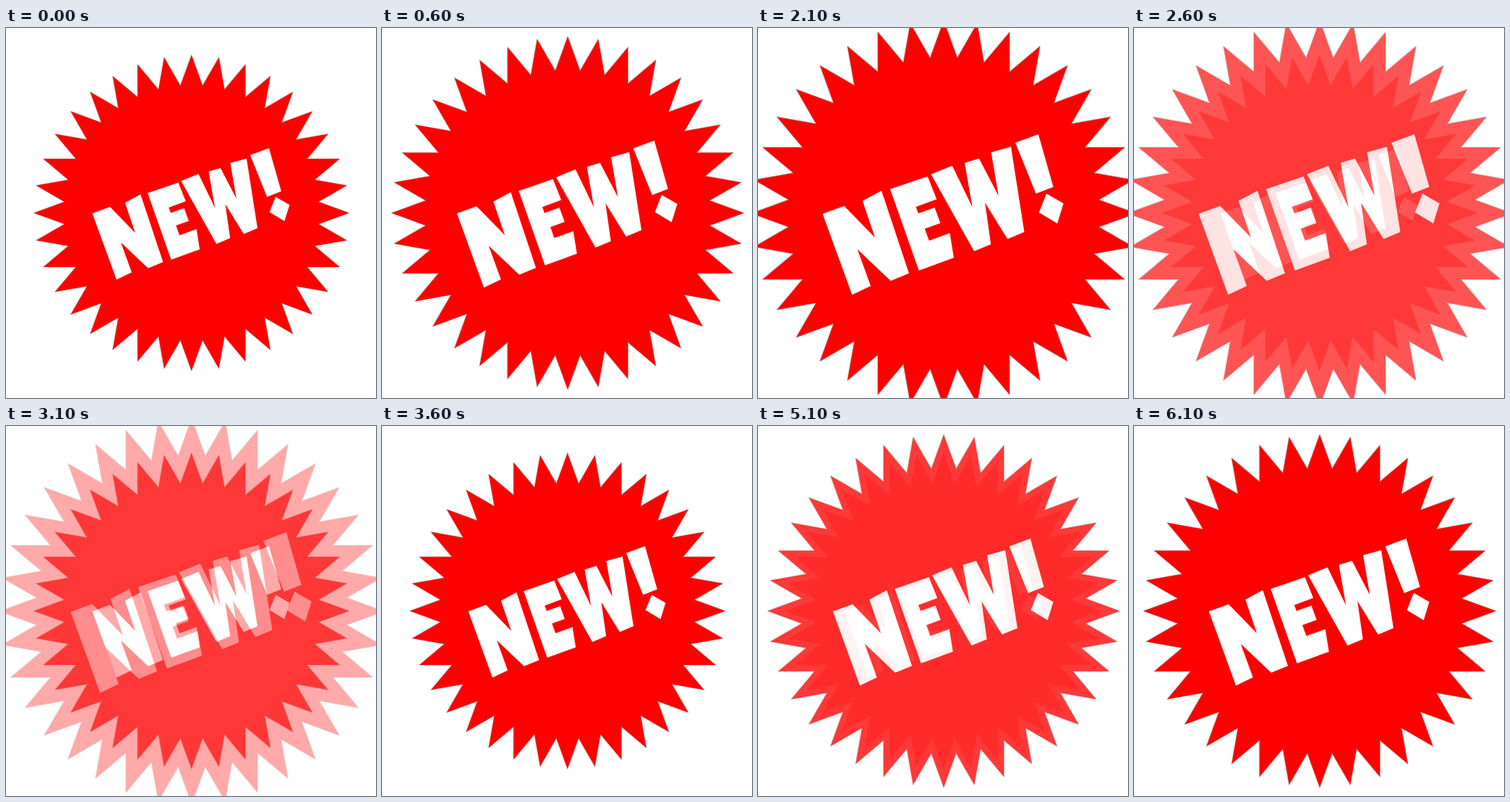
Recreate the animation shown at these times as an HTML page. Size 512 px wide and 511 px high, loop 6.6 s.

```html
<!DOCTYPE html>
<html lang="en">
<head>
<meta charset="utf-8">
<title>New badge</title>
<style>
  html, body { margin: 0; width: 100%; height: 100%; overflow: hidden; background: #fff; }
  svg { display: block; width: 512px; height: 511px; }
</style>
</head>
<body>
<svg viewBox="0 0 512 511" role="img" aria-label="NEW!">
  <defs>
    <g id="badge">
      <polygon id="burst" fill="#f00" stroke="#bbb" stroke-width="1.6" stroke-linejoin="round" paint-order="stroke"/>
      <!-- Lettering: x runs along the baseline, y = 0 is the baseline -->
      <path fill="#fff" transform="translate(-116 103) rotate(-20)" d="
        M0 0 0-109 29-109 52-58 53-107 80-111 77-1 52 0 26-52 26-2.5Z
        M91-109 141-108 142-77H114V-68H136V-47H115V-31H143L137 0H90Z
        M146-109 175-110 181-52 191-108 210-107 217-54 227-109 253-107 232 0 209 1 198-52 187 0 164 1Z
        M260-110 291-110 286-41 262.5-40.5Z
        M275-36 291-17 275 4 258-17Z"/>
    </g>
  </defs>
  <use id="small" href="#badge" transform="translate(256.7 255.4) scale(.895)"/>
  <use id="medium" href="#badge" transform="translate(257 255.5)"/>
  <use id="large" href="#badge" transform="translate(257 256) scale(1.093)"/>
</svg>
<script>
const LOOP = 6600, TIPS = 36, RADIUS = 243.5;
const rad = deg => deg * Math.PI / 180;
// This valley depth makes the edges beside the 20° and 70° tips vertical and horizontal.
const VALLEY = RADIUS * Math.cos(rad(70)) / Math.cos(rad(65));

const points = Array.from({ length: TIPS * 2 }, (_, i) => {
  const r = i % 2 ? VALLEY : RADIUS, a = rad(i * 180 / TIPS);
  return [r * Math.sin(a), -r * Math.cos(a)].map(v => v.toFixed(2));
});
document.getElementById('burst').setAttribute('points', points.join(' '));

const layers = ['small', 'medium', 'large'].map(id => document.getElementById(id));

// Start time in ms, then the opacity of the small, medium and large badge
const steps = [
  [0, 1, 0, 0], [200, 0, 1, 0], [400, 1, 0, 0], [600, 0, 1, 0],
  [1100, 0, 0, 1], [1600, 0, 1, 0], [2100, 0, 0, 1],
  [2600, 1/3, 0, 2/3], [3100, 2/3, 0, 1/3], [3600, 1, 0, 0],
  [4100, 2/3, 1/3, 0], [4600, 1/3, 2/3, 0],
  [5100, 2/9, 7/9, 0], [5600, 1/9, 8/9, 0], [6100, 0, 1, 0]
];

function draw(now) {
  const t = now % LOOP;
  const [, ...opacity] = steps.filter(([start]) => start <= t).pop();
  layers.forEach((layer, i) => layer.setAttribute('opacity', opacity[i]));
}

function tick() {
  draw(performance.now());
  requestAnimationFrame(tick);
}
tick();
</script>
</body>
</html>
```
